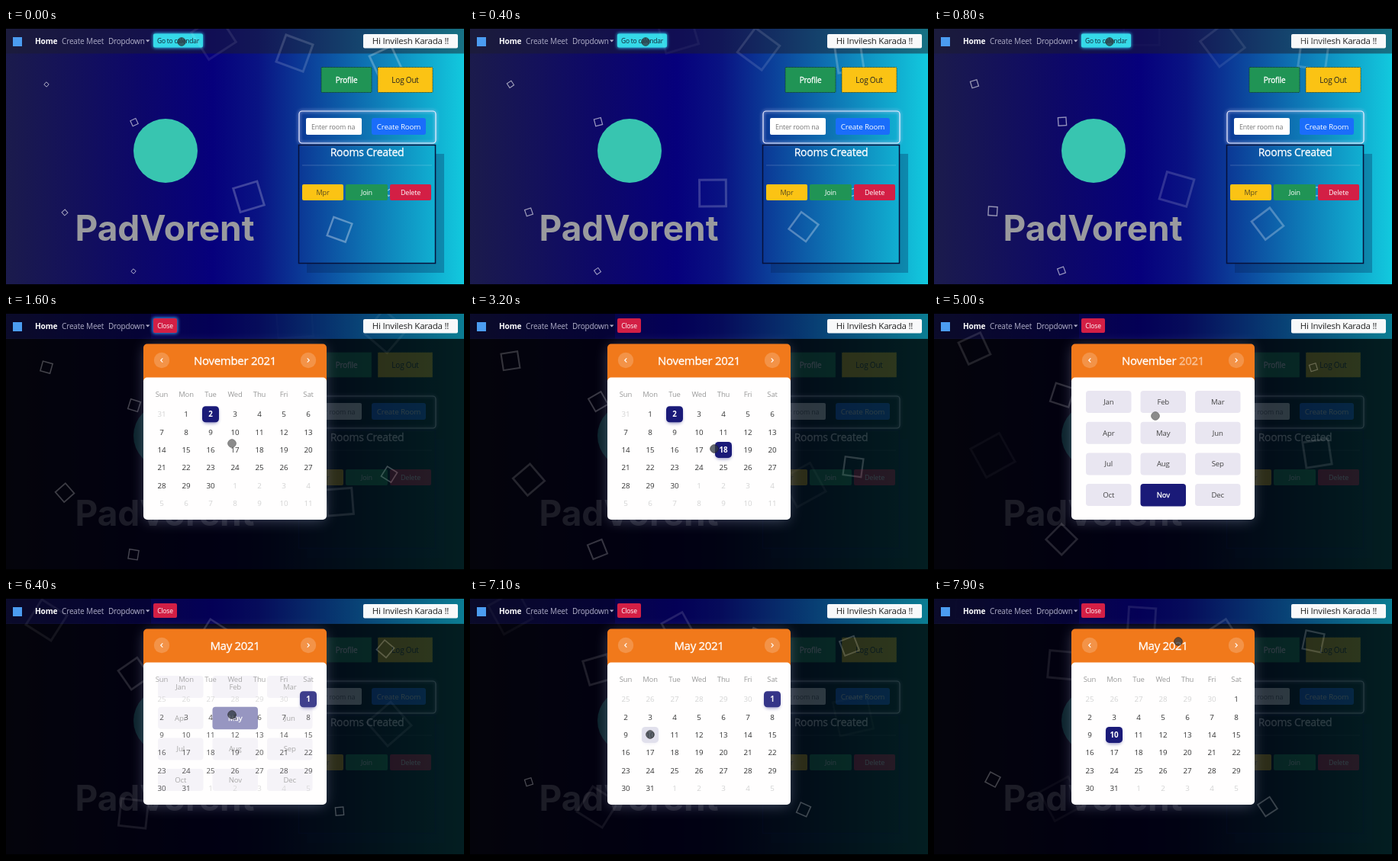
An HTML page that plays this animation: 600x337 px, repeating every 8 s.

```html
<!DOCTYPE html>
<html lang="en">
<head>
<meta charset="utf-8">
<title>Room calendar</title>
<style>
html, body { margin: 0; width: 100%; height: 100%; overflow: hidden; background: #000; }
svg { display: block; width: 100vw; height: 100vh; }
text { font-family: "Open Sans", "Noto Sans", sans-serif; letter-spacing: -.02em; }
.brand { font-family: Inter, sans-serif; letter-spacing: 0; }
</style>
</head>
<body>
<svg id="stage" viewBox="0 0 600 337" preserveAspectRatio="none">
  <defs>
    <linearGradient id="sky">
      <stop offset="0" stop-color="#1b1b4c"/>
      <stop offset=".28" stop-color="#0d0868"/>
      <stop offset=".45" stop-color="#06007c"/>
      <stop offset=".55" stop-color="#091383"/>
      <stop offset="1" stop-color="#12c9de"/>
    </linearGradient>
    <filter id="glow" x="-30%" y="-60%" width="160%" height="220%"><feGaussianBlur stdDeviation="2"/></filter>
    <filter id="halo" x="-20%" y="-20%" width="140%" height="140%"><feGaussianBlur stdDeviation="9"/></filter>
  </defs>
</svg>
<script>
const stage = document.getElementById('stage');
const LOOP = 8000;
const NAVY = '#1a1a78', GREEN = '#209455', YELLOW = '#fbc314', RED = '#d31f45';
const BOLD = 'font-weight="700"';
const FIRM = 'stroke="#fff" stroke-width=".3"';

const rect = (x, y, w, h, fill, rx = 0, extra = '') =>
  `<rect x="${x}" y="${y}" width="${w}" height="${h}" rx="${rx}" fill="${fill}" ${extra}/>`;
const circle = (x, y, r, fill, extra = '') =>
  `<circle cx="${x}" cy="${y}" r="${r}" fill="${fill}" ${extra}/>`;
const label = (str, x, y, size, fill, anchor = 'middle', extra = '') =>
  `<text x="${x}" y="${y}" font-size="${size}" fill="${fill}" text-anchor="${anchor}" ${extra}>${str}</text>`;
const group = (id, body) => `<g id="${id}">${body}</g>`;
const button = (str, x, y, w, h, fill, ink, size, rx = 2, boxExtra = '', textExtra = '') =>
  rect(x, y, w, h, fill, rx, boxExtra) + label(str, x + w / 2, y + h / 2 + size * .36, size, ink, 'middle', textExtra);
const setAll = (node, attrs) => Object.entries(attrs).forEach(([k, v]) => node.setAttribute(k, v));

// Dashboard
const dotted = 'stroke="#10301f" stroke-dasharray="1 1"';
const controls =
  circle(209, 161, 42, '#38c5b0') +
  label('PadVorent', 208, 278.5, 46, '#999a9e', 'middle', BOLD + ' class="brand"') +
  button('Profile', 413, 51.5, 66, 33, GREEN, '#fff', 10, 1, dotted, FIRM) +
  button('Log Out', 487, 51.5, 72, 33, YELLOW, '#222', 10, 1, dotted) +
  '<path d="M563 165h11v156H394v-12h169z" fill="#06204f" opacity=".3"/>' +
  rect(384, 109, 179, 42, 'none', 4, 'stroke="#d9d4ff" stroke-width="2" opacity=".7" filter="url(#glow)"') +
  rect(384, 109, 179, 42, 'none', 4, 'stroke="#eef" stroke-width="1.2"') +
  rect(393, 118, 73, 22, '#fff', 2) + label('Enter room na', 400, 132.5, 8.9, '#777', 'start') +
  button('Create Room', 479, 118, 71, 22, '#1a6dfa', '#fff', 9.8, 3) +
  rect(383.5, 153.5, 179, 155, 'none', 0, 'stroke="#07103a" stroke-width="1.5"') +
  label('Rooms Created', 473, 168, 14, '#fff', 'middle', FIRM) +
  rect(388, 179.5, 170, 1, '#fff', 0, 'opacity=".18"') +
  button('Mpr', 388, 205, 54, 21, YELLOW, '#554a20', 9) +
  button('Join', 445, 205, 55, 21, GREEN, '#fff', 9) +
  button('Delete', 503, 205, 54, 21, RED, '#fff', 9);

const bar = (tint, alpha) =>
  rect(0, 0, 600, 33.5, 'url(#sky)') + rect(0, 0, 600, 33.5, tint, 0, `opacity="${alpha}"`);
const nav =
  bar('#1c1c2c', .5) +
  group('navDim', bar('#000018', .38) + rect(0, 0, 190, 33.5, '#000010', 0, 'opacity=".35"')) +
  rect(9, 12, 12, 12, '#4b9cf0') +
  label('Home', 38, 21.3, 10.2, '#fff', 'start', BOLD) +
  label('Create Meet', 73, 21.3, 10.1, '#aaa9c4', 'start') +
  label('Dropdown', 134, 21.3, 10, '#b4b3cb', 'start') +
  '<path d="M183 15.5h5.4l-2.7 3z" fill="#b4b3cb"/>' +
  rect(468, 8, 124, 18.5, '#f8f9fa', 2) +
  label('Hi Invilesh Karada !!', 530, 21.3, 11.5, '#222') +
  group('openButton',
    rect(193, 7, 65, 19, '#36d8ff', 2, 'filter="url(#glow)"') +
    button('Go to calendar', 193, 7.5, 65, 18, '#35d9e8', '#123', 8.4)) +
  group('closeButton',
    rect(192, 6, 33, 21, '#3fa8f5', 3, 'id="focusRing" filter="url(#glow)"') +
    button('Close', 193, 7, 31, 19, RED, '#fff', 8.5));

// Calendar
const colX = i => 204 + 32 * i;
const rowY = i => 132.8 + 23.3 * i;

function monthGrid(before, firstCol, length) {
  let out = 'Sun Mon Tue Wed Thu Fri Sat'.split(' ')
    .map((d, i) => label(d, colX(i), 110, 9.5, '#999')).join('');
  for (let i = 0; i < 42; i++) {
    const day = i - firstCol + 1;
    const inside = day >= 1 && day <= length;
    const n = inside ? day : day < 1 ? before + day : day - length;
    out += label(n, colX(i % 7), rowY(Math.floor(i / 7)) + 3.5, 9.8, inside ? '#333' : '#d3d3d3');
  }
  return out;
}

function pick(id, day, firstCol) {
  const cell = day + firstCol - 1;
  const x = colX(cell % 7), y = rowY(Math.floor(cell / 7));
  return group(id,
    rect(x - 10, y - 8, 20, 20, '#5656a0', 5, 'opacity=".65" filter="url(#glow)"') +
    button(day, x - 11, y - 10.5, 22, 21, NAVY, '#fff', 9.8, 4.5, '', BOLD));
}

function monthTile(name, i) {
  const x = 199 + 71.5 * (i % 3), y = 102 + 40.7 * Math.floor(i / 3);
  const tile = button(name, x, y, 59.5, 29, '#e9e6f1', '#444', 9.6, 4);
  const lit = button(name, x, y, 59.5, 29.5, NAVY, '#fff', 9.6, 4, '', FIRM);
  return tile + (name === 'Nov' || name === 'May' ? group('tile' + name, lit) : '');
}

const arrow = (x, dir) => circle(x, 62, 10.2, '#fff', 'opacity=".2"') +
  `<path d="M${x - dir * 1.3} 59.3l${dir * 2.6} 2.7l${-dir * 2.6} 2.7" fill="none" stroke="#fff" stroke-width="1.1"/>`;
const title = (id, month) => group(id,
  label(`${month} <tspan class="year">2021</tspan>`, 300, 68.3, 15, '#fff', 'middle', FIRM));

const calendar = group('calendar',
  rect(182, 44, 236, 228, '#c8d4ff', 6, 'opacity=".32" filter="url(#halo)"') +
  rect(180, 40.5, 240, 60, '#f1791b', 5) + rect(180, 84.5, 240, 186.5, '#fffefe', 5) +
  arrow(204, -1) + arrow(396, 1) + title('titleNov', 'November') + title('titleMay', 'May') +
  group('november', monthGrid(31, 1, 30) + pick('nov2', 2, 1) + pick('nov18', 18, 1)) +
  group('months', 'Jan Feb Mar Apr May Jun Jul Aug Sep Oct Nov Dec'.split(' ').map(monthTile).join('')) +
  group('may', monthGrid(30, 6, 31) + pick('may1', 1, 6) + pick('may10', 10, 6)));

// Drifting squares all follow one life cycle: spawn x, spawn y, initial age, pace
const LIFE = 9.2;
const spots = [
  [378, 74, 6.1, 1], [497, 72, 5, 1], [272, 66, 7, 1], [318, 251, 5.2, 1], [437, 281, 3.9, 1],
  [168, 124, .6, .65], [53, 74, 0, 1], [77, 242, .2, 1.38], [167, 319, 0, .9], [502, 216, .4, 1]
];

stage.insertAdjacentHTML('beforeend',
  rect(0, 0, 600, 337, 'url(#sky)') + rect(0, 0, 600, 337, '#000', 0, 'id="shade"') + nav +
  group('squares', spots.map(() => '<rect fill="none" stroke="#fff"/>').join('')) +
  group('controls', controls) + calendar +
  rect(0, 0, 600, 1, '#000') + rect(0, 336, 600, 1, '#000') + circle(0, 0, 5.3, '#777', 'id="cursor"'));

const el = {};
stage.querySelectorAll('[id]').forEach(n => el[n.id] = n);
const fade = (id, amount) => {
  el[id].setAttribute('opacity', amount);
  el[id].style.display = amount > 0 ? '' : 'none';
};
const ramp = (t, from, to) => Math.min(1, Math.max(0, (t - from) / (to - from)));
const smooth = (t, from, length) => {
  const u = ramp(t, from, from + length);
  return u * u * (3 - 2 * u);
};

// Cursor stops: x, y, arrival time, how long the button is held
const TRAVEL = 650;
const stops = [
  [230, 18, 0, 900], [296, 171, 1600, 0], [320, 178, 3000, 350], [310, 64, 4150, 300],
  [290, 135, 5000, 0], [296, 153, 6200, 350], [236, 179, 7050, 250], [320, 57, 7800, 300]
];

function drawSquares(t, open) {
  spots.forEach(([x, y0, age0, pace], i) => {
    const age = (age0 + pace * t / 1000) % LIFE;
    const size = 4.5 + 5.4 * age, y = y0 - 1.1 * age * age;
    setAll(el.squares.children[i], {
      x: x - size / 2, y: y - size / 2, width: size, height: size,
      transform: `rotate(${41 * age - 50} ${x} ${y})`,
      'stroke-width': Math.min(3, .6 + size * .07),
      opacity: Math.max(0, .65 * (1 - age / 8)) * (1 - .5 * open)
    });
  });
}

function drawCursor(t) {
  let [x, y] = stops[0], down = false;
  for (const [sx, sy, arrival, hold] of stops) {
    const u = smooth(t, arrival - TRAVEL, TRAVEL);
    x += (sx - x) * u;
    y += (sy - y) * u;
    down ||= t >= arrival && t < arrival + hold;
  }
  setAll(el.cursor, {
    cx: x, cy: y, fill: down ? '#303840' : '#777', stroke: down ? '#222' : '#666', opacity: down ? .75 : .85
  });
}

function render(t) {
  const open = smooth(t, 830, 270);
  const toMonths = smooth(t, 4250, 350);
  const pressMay = ramp(t, 6200, 6350);
  const chose10 = ramp(t, 7080, 7250);

  fade('shade', .85 * open);
  fade('controls', 1 - .83 * open);
  fade('navDim', open);
  fade('openButton', 1 - open);
  fade('closeButton', open);
  fade('focusRing', t < 3050 ? .9 : 0);
  fade('calendar', open);

  fade('november', 1 - toMonths);
  fade('nov2', 1 - ramp(t, 3200, 3450));
  fade('nov18', ramp(t, 3050, 3200));
  fade('months', toMonths * (1 - smooth(t, 6220, 340)));
  fade('tileNov', 1 - pressMay);
  fade('tileMay', pressMay);
  fade('may', smooth(t, 6230, 230));
  fade('may1', 1 - chose10);
  fade('may10', chose10);

  fade('titleNov', t < 6250 ? 1 : 0);
  fade('titleMay', t < 6250 ? 0 : 1);
  el.titleNov.querySelector('.year').setAttribute('opacity', 1 - .3 * toMonths);
  el.titleNov.querySelector('.year').setAttribute('fill-opacity', 1 - .3 * toMonths);

  drawSquares(t, open);
  drawCursor(t);
}

const start = performance.now();
function tick() {
  render((performance.now() - start) % LOOP);
  requestAnimationFrame(tick);
}
tick();
</script>
</body>
</html>
```
